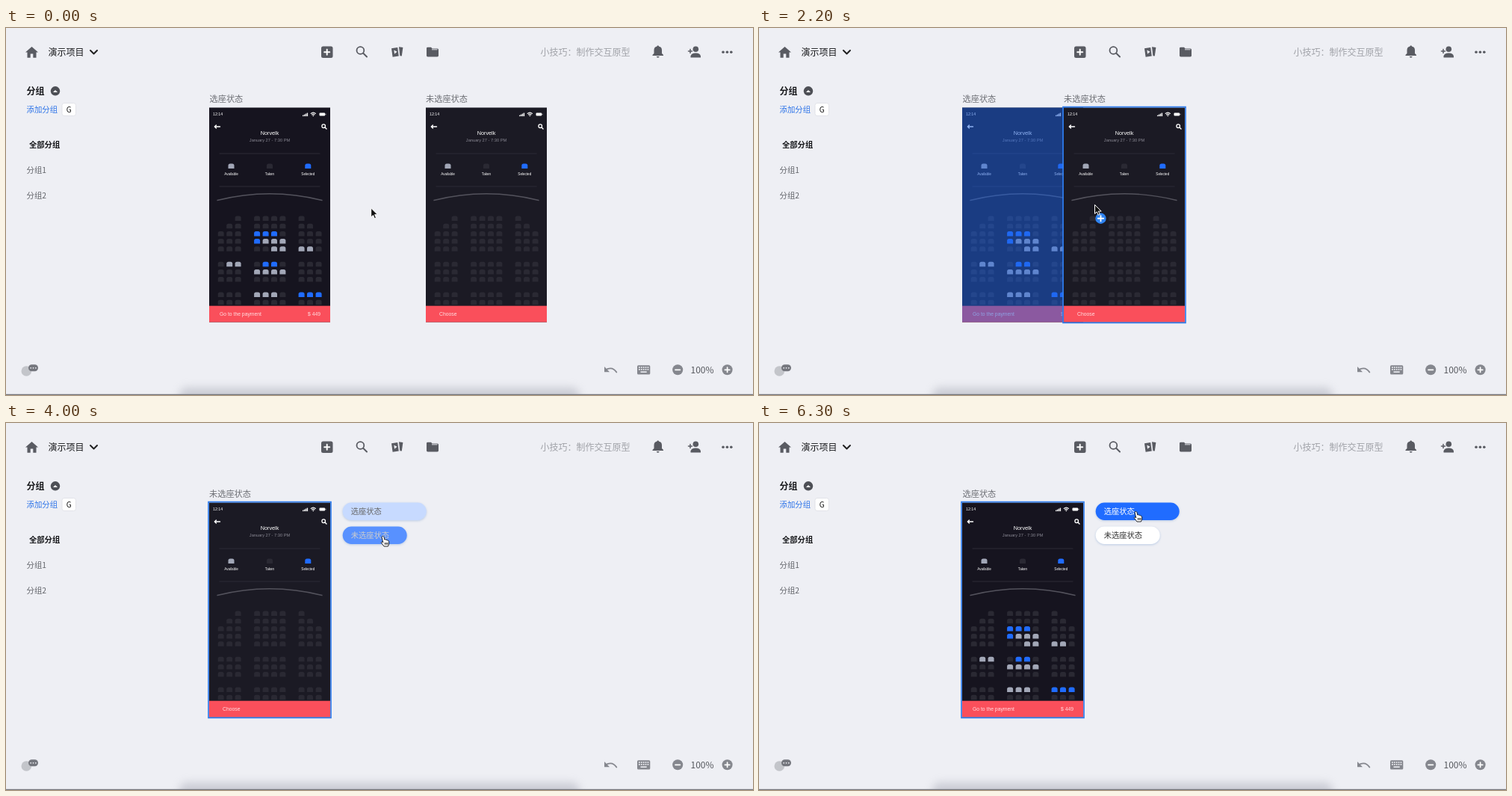
An HTML page that plays this animation: 1000x491 px, repeating every 7300 ms.

```html
<!DOCTYPE html>
<html lang="zh-CN">
<head>
<meta charset="utf-8">
<title>Seat states</title>
<style>
html, body { margin: 0; width: 100%; height: 100%; overflow: hidden; background: #eeeff4; }
svg { display: block; width: 100vw; height: 100vh; }
text { font-family: "Noto Sans CJK SC", "Noto Sans CJK", sans-serif; white-space: pre; }
.en text { font-family: "Liberation Sans", sans-serif; }
.line { fill: none; stroke-linecap: round; stroke-linejoin: round; }
.soft { filter: blur(6px); }
.tab rect { filter: drop-shadow(0 1px 1.5px #6f97cc66); }
</style>
</head>
<body>
<svg id="stage" viewBox="0 0 1000 491" preserveAspectRatio="none"></svg>
<script>
const BLUE = '#206cff', ICON = '#595b62', DIM = '#85878e', BG = '#eeeff4';
const HOME = 272, AWAY = 562, CLICK_B = 3800, CLICK_A = 5100;

const text = (x, cy, size, str, fill, extra = '') =>
  `<text x="${x}" y="${cy + size * .37}" font-size="${size}" fill="${fill}" ${extra}>${str}</text>`;
const rect = (x, y, w, h, fill, r = 0, extra = '') =>
  `<rect x="${x}" y="${y}" width="${w}" height="${h}" rx="${r}" fill="${fill}" ${extra}/>`;
const circle = (x, y, r, fill) => `<circle cx="${x}" cy="${y}" r="${r}" fill="${fill}"/>`;
const fill = (d, color) => `<path d="${d}" fill="${color}"/>`;
const line = (d, color, w) => `<path class="line" d="${d}" stroke="${color}" stroke-width="${w}"/>`;

// Seat letters: t taken, a available, s selected, space for none
const TINT = { t: '#2a2933', a: '#a2a7b7', s: BLUE };
const COLS = [15.7, 27.2, 38.6, 64.1, 75.6, 87, 98.4, 123.6, 135, 146.6];
const FREE = ['  ttttttt ', ' ttttttttt', 'tttttttttt'];
const BOOKED = ['  tttttt  ', ' tttttttt ', 'tttssstttt', 'tttsaaattt', 'tttttaaaat', '',
  'taatssTttt', 'tttaaaattt', 'tttttttttt', '', 'tttaaatsss', 'tttttttttt'];
BOOKED[6] = 'taattssttt'.replace('ttss', 'tsst').slice(0, 10);

function seat(x, y, kind) {
  return fill(`M${x - 4} ${y + 3.3}V${y - .6}Q${x - 4} ${y - 3.2} ${x - 1.4} ${y - 3.2}H${x + 1.4}` +
    `Q${x + 4} ${y - 3.2} ${x + 4} ${y - .6}V${y + 3.3}Z`, TINT[kind]);
}

function seats(rows) {
  return rows.map((row, r) => [...row].map((k, c) =>
    k === ' ' ? '' : seat(COLS[c], 148.7 + r * 10.2, k)).join('')).join('');
}

function phone(id, body, rows, footer) {
  const mid = 'text-anchor="middle"';
  const legend = [['a', 'Available', 29.5], ['t', 'Taken', 81], ['s', 'Selected', 132.3]];
  return `<g id="${id}" class="en">
    ${rect(0, .5, 162, 287, body)}
    ${text(5, 9.5, 5.3, '12:14', '#fff')}
    ${[0, 1, 2, 3].map(i => rect(125 + i * 1.9, 10.6 - i, 1.4, 1.5 + i, '#fff')).join('')}
    ${line('M136.2 8.5Q139.3 5.7 142.4 8.5M137.6 10Q139.3 8.4 141 10', '#fff', 1.1)}${circle(139.3, 11.4, .8, '#fff')}
    ${rect(147.5, 7.4, 7.6, 4.2, '#fff', 1)}${rect(155.5, 8.7, .8, 1.6, '#fff')}
    ${line('M7.5 26H14.5M9.4 24L7.3 26L9.4 28', '#fff', 1.4)}
    ${line('M155 27L157 29', '#fff', 1.5)}<circle cx="153.2" cy="25.2" r="2.3" fill="none" stroke="#fff" stroke-width="1.3"/>
    ${text(81, 33.8, 7.3, 'Norvelk', '#fff', mid)}
    ${text(81, 43.4, 5.7, 'January 27 - 7:30 PM', '#8b8a95', mid)}
    ${rect(13.5, 61.5, 135, 1, '#2c2a36')}${rect(13.5, 105.5, 135, 1, '#2c2a36')}
    ${legend.map(([k, s, x]) => seat(x, 78.6, k) + text(x, 89.6, 4.6, s, '#fff', mid)).join('')}
    ${line('M11 124.5Q81 107 151 124.5', '#53525c', 1.4)}
    ${seats(rows)}
    ${rect(0, 265.7, 162, 21.8, '#fa4f5b')}
    ${footer}
  </g>`;
}

const open = BOOKED.map((row, i) => row && (i < 2 ? row : FREE[2]));
const pay = text(14, 276.8, 6.8, 'Go to the payment', '#ffdfe2') +
  text(149, 276.8, 6.8, '$ 449', '#ffdfe2', 'text-anchor="end"');
const choose = text(18, 276.8, 6.8, 'Choose', '#ffdfe2');

const chrome = `
  ${rect(232, 481, 536, 30, '#9295a3', 10, 'class="soft" opacity=".38"')}
  ${rect(0, 489.8, 1000, 1.2, '#74767c')}
  ${fill('M34.5 25L43 32.6H40.5V39.7H36.3V34.4H32.7V39.7H28.5V32.6H26Z', ICON)}
  ${text(56.5, 32.3, 12, '演示项目', '#17181b', 'font-weight="500"')}
  ${line('M113 30L117.5 34.5L122 30', '#222', 2)}
  ${rect(422, 24.5, 15.5, 15.5, ICON, 2.5)}${line('M429.7 28.8V35.7M426.2 32.2H433.2', '#fff', 2)}
  <circle cx="474.4" cy="30" r="4.9" fill="none" stroke="${ICON}" stroke-width="1.8"/>
  ${line('M478.2 33.8L483 38.5', ICON, 2)}
  ${fill('M516 27.2L524.2 26L525.8 37.6L517.6 38.8Z', ICON)}${fill('M519.4 29.6L523.6 31.8L520 34.8Z', BG)}
  ${fill('M526 25.2L531.4 26L529.8 37.6L527.4 37.3Z', ICON)}
  ${fill('M563 27.2Q563 25.8 564.5 25.8H569L570.6 27.5H577.5Q579 27.5 579 29V37Q579 38.4 577.5 38.4H564.5Q563 38.4 563 37Z', ICON)}
  ${rect(570, 28.4, 7.5, .9, BG)}
  ${text(715.5, 32.8, 12, '小技巧：制作交互原型', '#a0a2a8')}
  ${fill('M865.5 37V36L867.5 34V29.5Q867.5 25.6 871.3 24.8Q871.3 23.5 872.7 23.5Q874.1 23.5 874.1 24.8Q878 25.6 878 29.5V34L880 36V37ZM870.8 38H874.6Q874.4 39.8 872.7 39.8Q871 39.8 870.8 38Z', ICON)}
  ${circle(923.3, 28.2, 3.8, ICON)}${fill('M916.5 39.5V37.4Q917.5 33.6 923.3 33.6Q929 33.6 930 37.4V39.5Z', ICON)}
  ${line('M916 28.5V33.5M913.5 31H918.5', ICON, 1.5)}
  ${[960, 965.4, 970.8].map(x => circle(x, 32.3, 1.8, ICON)).join('')}
  ${text(27.5, 84.3, 12, '分组', '#16171a', 'font-weight="700"')}
  ${circle(66, 84.3, 6.2, '#4d4f55')}${fill('M63 86L66 82.9L69 86Z', '#fff')}
  ${text(27.5, 109, 10.4, '添加分组', '#2b72e8')}
  ${rect(75, 100.5, 18.5, 17, '#fff', 3, 'stroke="#dcdee4" stroke-width=".8"')}
  ${text(84.2, 109, 10, 'G', '#111', 'text-anchor="middle" font-weight="500"')}
  ${text(31, 156, 10.3, '全部分组', '#16171a', 'font-weight="700"')}
  ${text(27.5, 190, 10.4, '分组1', '#63656b')}
  ${text(27.5, 224.5, 10.4, '分组2', '#63656b')}
  ${circle(27.3, 459, 6.8, '#c3c5ca')}${rect(30, 450.3, 13, 9, '#74767d', 4.5)}
  ${[33.2, 36.5, 39.8].map(x => circle(x, 454.8, .9, BG)).join('')}
  ${line('M802.5 457.2Q812 452.2 817.3 460.5', DIM, 1.8)}${fill('M801 453V460.2H808Z', DIM)}
  ${rect(845, 451.2, 17.3, 12.2, DIM, 1.5)}
  ${[0, 1].map(r => [0, 1, 2, 3, 4].map(c => rect(847 + c * 2.9, 453.2 + r * 2.8, 1.7, 1.7, BG)).join('')).join('')}
  ${rect(849.5, 459.4, 8.2, 1.6, BG)}
  ${circle(899.2, 457.3, 7, DIM)}${line('M896 457.3H902.4', '#fff', 1.7)}
  ${circle(965.6, 457.3, 7, DIM)}${line('M962.4 457.3H968.8M965.6 454.1V460.5', '#fff', 1.7)}
  ${text(932, 457.3, 12, '100%', '#55575d', 'text-anchor="middle"')}`;

const tab = (id, y, w, str) =>
  `<g id="${id}" class="tab">${rect(450.7, y, w, 23.5, '#fff', 11.7)}${text(461.7, y + 11.8, 10.3, str, '#333')}</g>`;

document.getElementById('stage').innerHTML = `
  <defs>${phone('booked', '#16141f', BOOKED, pay)}${phone('free', '#1b1a24', open, choose)}</defs>
  ${rect(0, 0, 1000, 491, BG)}${chrome}
  <g id="shade" class="soft">${rect(274, 112, 158, 285, '#8fa8d2', 2, 'opacity=".55"')}</g>
  <g id="cardA" transform="translate(${HOME} 106)"><use href="#booked"/>${text(.5, -11.4, 11.2, '选座状态', '#6e7076')}</g>
  ${rect(HOME, 106.5, 162, 287, '#1e64e6', 0, 'id="target" opacity=".5"')}
  <g id="cardB"><rect x="2" y="-18" width="54" height="14" fill="${BG}"/><use href="#free"/>${text(0, -11.4, 11.2, '未选座状态', '#6e7076')}</g>
  <rect id="border" x="-1" y="-.4" width="164" height="288.8" fill="none" stroke="#2f7cec" stroke-width="1.7"/>
  <g id="tabs">${tab('tabA', 106.5, 112, '选座状态')}${tab('tabB', 138.5, 86, '未选座状态')}</g>
  <g id="cursor">
    <g id="plus">${circle(8, 18.3, 7.2, '#2f83f0')}${line('M8 14.6V22M4.3 18.3H11.7', '#fff', 1.8)}</g>
    <path id="arrow" d="M0 0V12L2.8 9.5L4.7 13.8L6.8 12.9L4.9 8.7H8.7Z" fill="#111" stroke="#fff" stroke-width="1"/>
    <path id="hand" d="M1 .6C2 .2 2.8 .8 3 1.8L3.7 5C5 4.6 6 5 6.2 5.6C7.2 5.2 8 5.8 8.2 6.4C9.2 6.3 9.6 7 9.6 8V11L8.4 14H3L-.4 9.6C-1.2 8.6-.2 7.6 .8 8.2L1.8 9L.1 2C-.1 1.2 .2 .8 1 .6ZM4.4 9V11.8M6.2 9V11.8M7.8 9V11.8"
      fill="#fff" stroke="#111" stroke-width=".9" stroke-linejoin="round"/>
  </g>`;

const $ = id => document.getElementById(id);
const show = (id, on) => $(id).setAttribute('display', on ? 'inline' : 'none');
const move = (id, x, y) => $(id).setAttribute('transform', `translate(${x} ${y})`);
const clamp = v => Math.min(1, Math.max(0, v));
const smooth = p => p * p * (3 - 2 * p);
const part = (t, from, to) => clamp((t - from) / (to - from));
const mix = (a, b, p) => a + (b - a) * p;

function along(t, keys) {
  const i = keys.findIndex(k => k[0] > t);
  if (i === 0) return keys[0][1];
  if (i < 0) return keys[keys.length - 1][1];
  const [t0, v0] = keys[i - 1], [t1, v1] = keys[i];
  return mix(v0, v1, (t - t0) / (t1 - t0));
}

const DRAG = [[1800, AWAY], [1900, 540], [2000, 502], [2100, 456], [2300, 360], [2400, 327], [2500, 310], [2700, 298]];

function pointer(t) {
  if (t < 1800) {
    const p = smooth(part(t, 900, 1700));
    return [mix(488.7, 603.5, p), mix(241, 232, p)];
  }
  if (t < 3100) return [along(t, DRAG) + 41.5, mix(233, 239, part(t, 1800, 2500)) - 1.5 * part(t, 2500, 2700)];
  const p = smooth(part(t, 3100, 3700));
  return [mix(339.5, 503, p), mix(237.5, 151, p) - 33 * smooth(part(t, 4300, 4900))];
}

function paintTab(id, k) {
  const [box, label] = $(id).children;
  box.setAttribute('fill', `rgb(${mix(255, 32, k)},${mix(255, 108, k)},255)`);
  const c = mix(51, 255, k);
  label.setAttribute('fill', `rgb(${c},${c},${c})`);
}

function draw(t) {
  const merged = t >= 2700, dragging = t >= 1800 && !merged;
  const click = t >= CLICK_A ? CLICK_A : CLICK_B;
  const blank = t >= click && t < click + 200;
  const onB = t >= CLICK_B && t < CLICK_A;
  const x = merged ? HOME : along(t, DRAG);
  const [cx, cy] = pointer(t);

  move('cardB', x, 106);
  move('border', x, 106);
  move('cursor', cx, cy);
  show('cardA', !merged || (!onB && !blank));
  show('cardB', !merged || (onB && !blank));
  show('border', dragging || t >= CLICK_B);
  show('target', dragging && x < 410);
  show('plus', dragging && x < 410);
  show('shade', merged && t < CLICK_B && cx < 434);
  show('tabs', t >= 2800);
  show('hand', cx > 451 && t > 3100);
  show('arrow', cx <= 451 || t <= 3100);

  const p = part(t, click + 100, click + 300), eased = p * (2 - p);
  const k = click === CLICK_A ? 1 - eased : eased;
  paintTab('tabA', 1 - k);
  paintTab('tabB', k);
}

function frame(now) {
  const t = Math.floor((now % 7300) / 100) * 100;
  draw(t < 1000 ? 0 : Math.min(t, 6300));
  requestAnimationFrame(frame);
}
draw(0);
requestAnimationFrame(frame);
</script>
</body>
</html>
```
